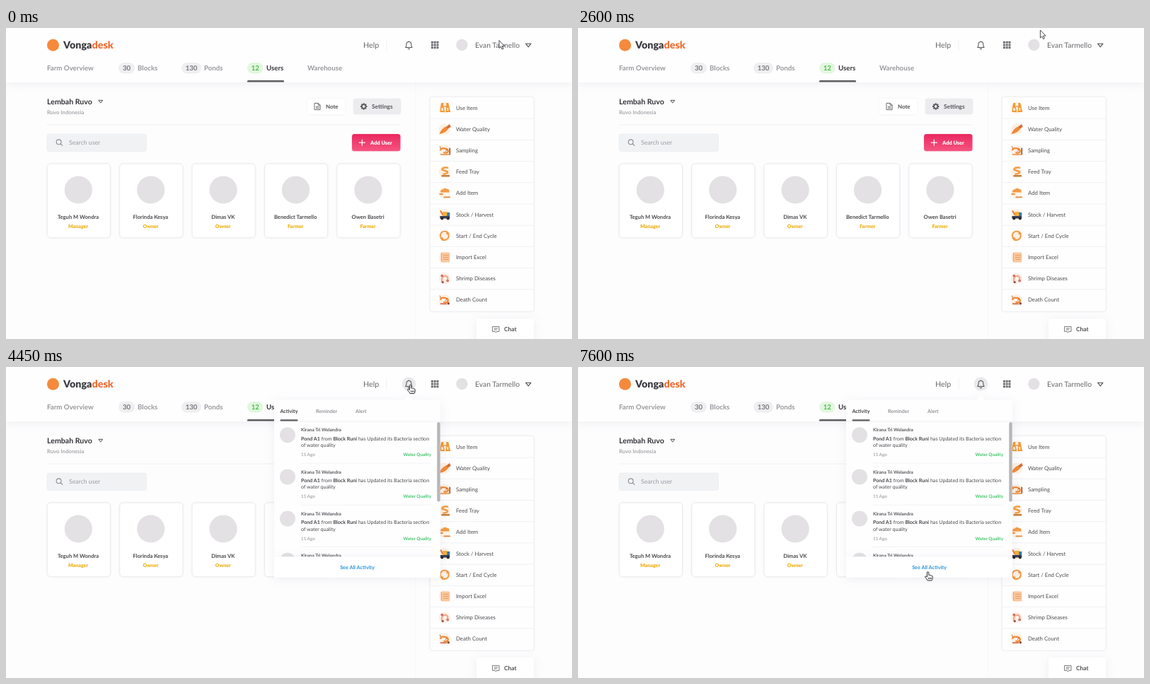
Write an HTML page that moves like this. It is 800 px wide and 440 px high and loops after 8000 ms.

```html
<!DOCTYPE html>
<html lang="en">
<head>
<meta charset="utf-8">
<title>Farm dashboard</title>
<style>
  html, body { margin: 0; width: 100%; height: 100%; overflow: hidden; background: #fefdfe; }
  svg { display: block; width: 800px; height: 440px; font-family: Lato, "Open Sans", sans-serif; text-rendering: geometricPrecision; }
  .b { font-weight: 700; }
  .x { font-weight: 900; }
  .ln { fill: none; stroke-linecap: round; stroke-linejoin: round; }
  .soft { filter: drop-shadow(0 .5px 1px rgba(40, 40, 70, .08)); }
  .wide { filter: drop-shadow(0 2px 7px rgba(40, 40, 70, .08)); }
</style>
</head>
<body>
<svg id="stage" viewBox="0 0 800 440"></svg>
<script>
const LOOP = 8000;
const stage = document.getElementById('stage');

const text = (x, y, s, size, fill, cls = '', anchor = 'start') =>
  `<text x="${x}" y="${y}" font-size="${size}" fill="${fill}" class="${cls}" text-anchor="${anchor}">${s}</text>`;
const box = (x, y, w, h, fill, r = 0, more = '') =>
  `<rect x="${x}" y="${y}" width="${w}" height="${h}" rx="${r}" fill="${fill}" ${more}/>`;
const dot = (x, y, r, fill) => `<circle cx="${x}" cy="${y}" r="${r}" fill="${fill}"/>`;
const line = (d, stroke, w = 1) => `<path class="ln" d="${d}" stroke="${stroke}" stroke-width="${w}"/>`;
const shape = (d, fill) => `<path d="${d}" fill="${fill}"/>`;
const at = (x, y, body) => `<g transform="translate(${x} ${y})">${body}</g>`;
const times = (n, f) => Array.from({ length: n }, (_, i) => f(i)).join('');

function header() {
  const pill = (x, w, n, bg, fg) =>
    box(x, 49, w, 15.5, bg, 7.7) + text(x + w / 2, 60.4, n, 9.6, fg, 'b', 'middle');
  const tab = (x, s, fill = '#98989c') => text(x, 60.4, s, 9.7, fill, 'b');
  return box(0, -10, 800, 87, '#fffeff', 0, 'class="wide"') +
    dot(66.5, 24.3, 8.5, '#f58a3c') +
    text(81, 28.6, 'Vonga<tspan fill="#ee6f35">desk</tspan>', 14.3, '#3c3c40', 'x') +
    text(505, 27.8, 'Help', 10.7, '#68686c') +
    line('M538 16V32', '#f0f0f2') +
    times(9, i => box(600.9 + i % 3 * 3.8, 18.7 + Math.floor(i / 3) * 3.8, 3, 3, '#707074', .5)) +
    dot(644.4, 24, 8.2, '#e3e1e3') +
    text(663, 28.2, 'Evan Tarmello', 10.4, '#68686c') +
    line('M734.6 22.2H742L738.3 26.8Z', '#4c4c50', 1.1) +
    tab(58, 'Farm Overview') +
    pill(159, 23, '30', '#efeff1', '#77777b') + tab(186, 'Blocks') +
    pill(248, 28, '130', '#efeff1', '#77777b') + tab(280, 'Ponds') +
    pill(341, 22.5, '12', '#e2f7df', '#52b950') + tab(368, 'Users', '#38383c') +
    tab(426, 'Warehouse') +
    shape('M341 76.6V75.4Q341 74 342.4 74H391.6Q393 74 393 75.4V76.6Z', '#5c5c60');
}

const bell = line('M564.7 27.5Q566 26.2 566 23.2C566 20.6 567.4 19.4 569.4 19.4S572.8 20.6 572.8 23.2Q572.8 26.2 574.1 27.5ZM568.2 29.2Q569.4 30 570.6 29.2M569.4 18.7V19', '#505054', 1.05);

function toolbar() {
  const gear = times(8, i => `<rect x="-1" y="-4.7" width="2" height="2.4" fill="#58585c" transform="rotate(${i * 45})"/>`) +
    '<circle r="2.7" fill="none" stroke="#58585c" stroke-width="1.5"/>';
  return text(58, 108.3, 'Lembah Ruvo', 10.6, '#333337', 'b') +
    line('M131.3 102.3H136.7L134 105.8Z', '#4c4c50') +
    text(58, 122.3, 'Ruvo Indonesia', 7.7, '#a8a8ac', 'b') +
    line('M58 137H558', '#f0eff2') +
    box(426, 100, 53, 22, '#fff', 3, 'class="soft"') +
    line('M436.4 106.4H441.2L444 109.2V115.6H436.4ZM441.2 106.4V109.2H444M438.4 111.4H442M438.4 113.4H442', '#58585c', .9) +
    text(452, 113.8, 'Note', 7.9, '#505054', 'b') +
    box(491, 100, 67, 22, '#ececef', 3, 'class="soft"') +
    at(505.7, 111, gear) +
    text(517, 113.8, 'Settings', 8.3, '#58585c', 'b') +
    box(58, 150, 140.5, 24.5, '#f0f2f4', 3, 'stroke="#ebeef0" stroke-width=".8"') +
    '<circle cx="74.6" cy="161.3" r="3.4" fill="none" stroke="#8c8c92" stroke-width="1.1"/>' +
    line('M77.2 163.9L79.8 166.4', '#8c8c92', 1.1) +
    text(89, 164.8, 'Search user', 8.7, '#9c9ca2') +
    box(489, 150, 68.5, 24.3, 'url(#pink)', 3.5, 'class="soft"') +
    line('M503.3 158.2V166.2M499.3 162.2H507.3', '#fff', 1.2) +
    text(515, 164.9, 'Add User', 7.4, '#fff', 'x');
}

function cards() {
  const users = [['Teguh M Wondra', 'Manager'], ['Florinda Kesya', 'Owner'], ['Dimas VK', 'Owner'],
    ['Benedict Tarmello', 'Farmer'], ['Owen Basetri', 'Farmer']];
  return users.map(([name, role], i) => at(58.3 + i * 102.4, 192,
    box(0, 0, 89.2, 104.8, '#fff', 5, 'stroke="#ebebf0" stroke-width="1" class="soft"') +
    dot(44, 37, 19.6, '#e3e1e3') +
    text(43.7, 78, name, 7.6, '#48484c', 'b', 'middle') +
    text(43.7, 91, role, 7.05, '#edb010', 'x', 'middle'))).join('');
}

// Small pictograms, each drawn around its own centre.
const shrimp = line('M-6 -1Q-5 -4 0 -3Q5 -2 4.5 1.5Q3 4 -1 3', '#f08a34', 2.3) +
  line('M-6 -3L-7 -6M1 1L3 -2', '#c9602c', .9);
const icons = [
  shape('M-5 -7H-2V-3L0 6H-7L-6 -2ZM2 -7H5L6 -2L8 6H1L2 -2Z', '#f39a34') + shape('M-5 0H-3L-2 4H-5ZM3 0H5V4H3Z', '#fff0d8') + line('M-1 -2H2', '#c9702c', 1.2),
  shape('M-8 7Q-5 -1 2 -4L5 -1Q2 5 -8 7Z', '#f18a38') + line('M3 -3L6.5 -6M4.5 -2L7.5 -4', '#d96a30', 2),
  shrimp + line('M7 -3V5', '#8a4a2c', 1.6) + line('M-6 5.5H7', '#e98a3c', 1.5),
  line('M4 -6Q-4 -7 -4 -3Q0 -2 4 0Q4 3 -2 3', '#f3993d', 2.2) + box(-5, 4.5, 12, 2.5, '#c98038', 1),
  shape('M-6 -4L0 -7L6 -5V-1H-6Z', '#f39b45') + box(-5, -1, 11, 6, '#fff5e6', 1) + line('M-7 1H-3M-1 5.5H7', '#e5873c', 1.8),
  box(-7, 2, 14, 3.5, '#384058', 1) + shape('M-3 -4H3L5 2H-3Z', '#f6b331') + box(3, -3, 4, 5, '#3c78b4') + dot(-4, 5.5, 2, '#28282c') + dot(4.5, 5.5, 2, '#28282c') + line('M-6 -5L-3 0', '#ee7836', 2),
  line('M-5 3A5.8 5.8 0 0 1 4 -4.5M5 -2A5.8 5.8 0 0 1 -4 4.5', '#f2943a', 1.8) + shape('M3 -7L7 -3L2 -2ZM-3 7L-7 3L-2 2Z', '#f2943a'),
  box(-5, -7, 12, 14, '#fac9a0', 1) + line('M-5 -6V6M-2 -3H5M-2 0H5M-2 3H5', '#ec9257', .9),
  line('M-4 4Q-6 -3 1 -4Q6 -2 3 3', '#f0aa94', 2.4) + dot(-4, -4, 1.8, '#d0686a') + dot(4, 3, 1.9, '#dc7474') + dot(-3, 5, 1.6, '#8f5060') + dot(1, 0, 1.4, '#fff'),
  shrimp + line('M-6 5.5H2', '#d35b38', 1.6) + dot(5, 5, 1.7, '#8d4633')
];

function sidebar() {
  const items = ['Use Item', 'Water Quality', 'Sampling', 'Feed Tray', 'Add Item', 'Stock / Harvest',
    'Start / End Cycle', 'Import Excel', 'Shrimp Diseases', 'Death Count'];
  return line('M579 77V440', '#f7f6f8') +
    box(599.3, 97.5, 146.8, 303.5, '#fffeff', 3, 'stroke="#efeff2" stroke-width="1" class="soft"') +
    items.map((s, i) => at(620.3, 113 + i * 30.2,
      (i ? line('M-20.5 -15.1H125.3', '#f0eff2') : '') +
      dot(-.5, 0, 8, '#fdf0e4') + icons[i] + text(15.7, 2.5, s, 7.8, '#4c4c50'))).join('') +
    box(665, 411, 81, 36, '#fff', 3, 'class="wide"') +
    line('M688 422.4H697V429.4H693.6L692.4 431L691.2 429.4H688ZM690.2 425H694.8M690.2 427H693.4', '#68686c', .9) +
    text(704, 429.4, 'Chat', 8.4, '#505054', 'b');
}

function popover() {
  const item = i => at(379, 77 + i * 59.2,
    dot(19, 19.2, 11, '#e3e1e3') +
    text(38, 14.4, 'Kirana Tri Welandra', 6.5, '#58585c', 'b') +
    text(38, 26.8, '<tspan class="b">Pond A1</tspan> from <tspan class="b">Block Runi</tspan> has Updated its Bacteria section', 7.12, '#48484c') +
    text(38, 36.3, 'of water quality', 7.12, '#48484c') +
    text(38, 49.2, '11 Ago', 6.3, '#a8a8ac', 'b') +
    text(222, 49.2, 'Water Quality', 6.3, '#42c468', 'b', 'end') +
    line('M38 59H222', '#f3f2f4'));
  return dot(569.4, 24, 9.8, '#e9e9ec') + bell +
    `<g class="wide">${box(379, 46.5, 235, 251.5, '#fffeff', 1.5)}${shape('M562 47L569.4 39.5L576.8 47Z', '#fffeff')}</g>` +
    text(387.5, 64.5, 'Activity', 7.15, '#404044', 'b') +
    text(438, 64.5, 'Reminder', 7.05, '#939397', 'b') +
    text(494, 64.5, 'Alert', 7.05, '#939397', 'b') +
    line('M379 77H614', '#f0eff1') +
    box(387.5, 74.2, 25, 2.3, '#5c5c60', 1) +
    `<g clip-path="url(#list)">${times(4, item)}</g>` +
    box(609.3, 78, 4.4, 112.5, '#b6b6b9', 2) +
    '<g clip-path="url(#foot)">' + box(379, 268.5, 235, 29.5, '#fff', 0, 'class="wide"') + '</g>' +
    text(496.5, 285.5, 'See All Activity', 7.25, '#2a92da', 'b', 'middle');
}

const arrow = '<path d="M0 0V11L2.5 8.7L4.2 12.6L6 11.8L4.3 8H7.7Z" fill="#fff" stroke="#38383c" stroke-width=".9" stroke-linejoin="round"/>';
const hand = '<path d="M-1.6 7V1Q-1.6 -.3 -.4 -.3T.8 1V4.4Q2 3.8 2.8 4.8Q4 4.3 4.6 5.4Q6 5 6.2 6.6V8.6Q6.2 10.6 5 12H-.9Q-2 9.8 -4.2 7.6Q-5 6.4 -3.9 6Q-2.8 5.8 -1.6 7ZM.6 8V10M2.4 8V10M4.2 8V10" fill="#f6f6f6" stroke="#303034" stroke-width="1" stroke-linejoin="round"/>';

stage.innerHTML = `<defs>
  <linearGradient id="pink" x1="0" y1="0" x2="0" y2="1"><stop stop-color="#ea2860"/><stop offset="1" stop-color="#f65580"/></linearGradient>
  <clipPath id="list"><rect x="379" y="77" width="235" height="191.5"/></clipPath>
  <clipPath id="foot"><rect x="379" y="255" width="235" height="43"/></clipPath>
</defs>` + box(0, 0, 800, 440, '#fefdfe') + sidebar() + header() + bell + toolbar() + cards() +
  `<g id="pop">${popover()}</g><g id="cursor"><g id="arrow">${arrow}</g><g id="hand">${hand}</g></g>`;

const [pop, cursor, arrowEl, handEl] = ['pop', 'cursor', 'arrow', 'hand'].map(id => document.getElementById(id));

// Pointer stops: time, x, y.
const path = [[0, 697, 17.5], [1450, 697, 17.5], [1950, 682, 5], [2600, 653.5, 3], [3100, 567, 25], [4000, 567, 25],
  [4200, 572, 25.5], [4700, 572, 25.5], [4850, 571, 32], [5250, 535.5, 227.5], [5650, 498, 281],
  [5850, 495, 290], [LOOP, 495, 290]];

// Slope at a stop; zero where the pointer rests on either side.
function slope(k, c) {
  const a = path[k - 1], p = path[k], b = path[k + 1];
  const rests = q => !q || (q[1] === p[1] && q[2] === p[2]);
  return rests(a) || rests(b) ? 0 : (b[c] - a[c]) / (b[0] - a[0]);
}

function pointer(t, c) {
  const k = path.findIndex(p => p[0] > t) - 1;
  const p = path[k], q = path[k + 1], d = q[0] - p[0], u = (t - p[0]) / d;
  const s = u * u * (3 - 2 * u);
  return p[c] + (q[c] - p[c]) * s + d * u * (1 - u) * ((1 - u) * slope(k, c) - u * slope(k + 1, c));
}

function draw(now) {
  const t = now % LOOP;
  const fade = Math.min(1, Math.max(0, (t - 3850) / 250));
  pop.setAttribute('opacity', fade);
  pop.style.display = fade ? '' : 'none';
  cursor.setAttribute('transform', `translate(${pointer(t, 1)} ${pointer(t, 2)})`);
  arrowEl.style.display = t < 4100 ? '' : 'none';
  handEl.style.display = t < 4100 ? 'none' : '';
  requestAnimationFrame(draw);
}
draw(performance.now());
</script>
</body>
</html>
```
